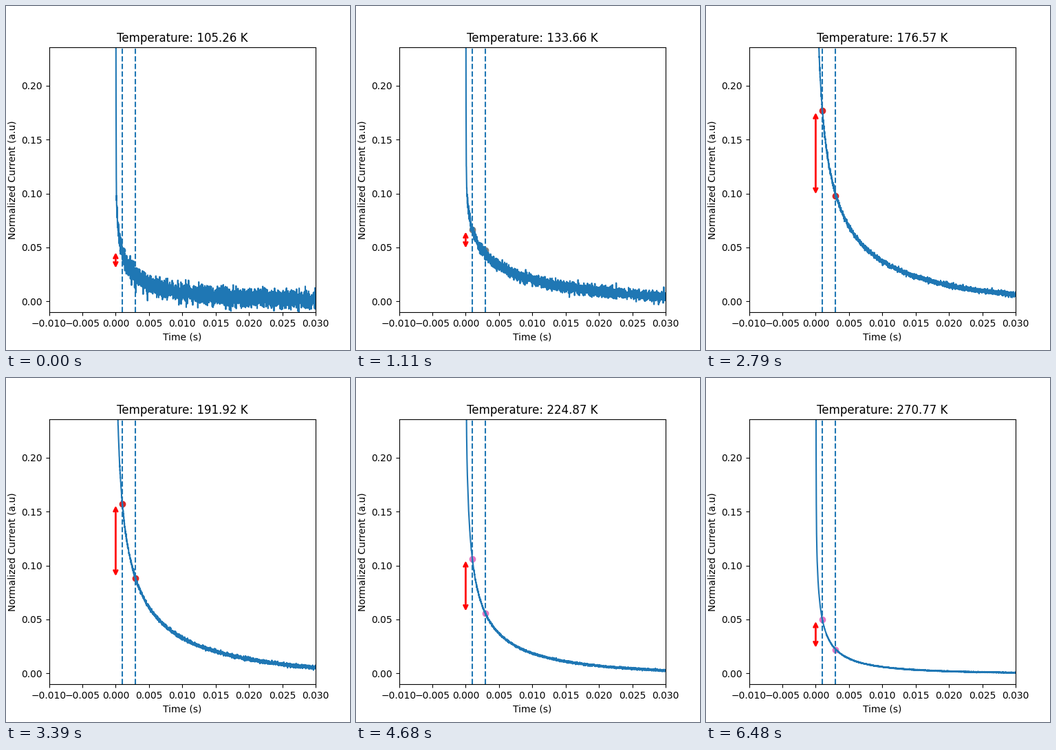
A matplotlib script for the animation above (6510 ms loop, 500 px wide and 500 px high).

```python
import numpy as np
import matplotlib.pyplot as plt
from matplotlib.animation import FuncAnimation

FRAMES, INTERVAL = 217, 30
DT = 0.01  # sampling step in ms
GATES = np.array([1, 3])  # ms
BASELINE = 44  # ms, where the decay is taken as zero
STRETCH = 0.3

# Key points of the sweep: step, temperature, amplitude, decay rate
STEP, TEMP, AMP, RATE = np.transpose([
    (0, 105.26, 0.215, 1.52),
    (37, 133.66, 0.193, 0.90),
    (67, 156.65, 0.647, 1.28),
    (93, 176.57, 0.746, 1.38),
    (134, 208.03, 0.585, 1.40),
    (178, 241.71, 0.505, 1.80),
    (216, 270.77, 0.387, 2.03),
])

t = np.arange(0, 31, DT)
gate_idx = np.rint(GATES / DT).astype(int)


def transient(i):
    """Stretched exponential with a short spike and fading noise."""
    amp, rate = np.interp(i, STEP, AMP), np.interp(i, STEP, RATE)

    def decay(x):
        return amp * np.exp(-rate * x ** STRETCH)

    spike = 0.5 * np.exp(-t / 0.03)
    sigma = 0.0042 * np.exp(-i / 70)
    noise = np.random.default_rng(i).normal(0, sigma, t.size)
    return decay(t) - decay(BASELINE) + spike + noise


fig, ax = plt.subplots(figsize=(5, 5), dpi=100)
ax.set_xlim(-0.01, 0.03)
ax.set_ylim(-0.01, 0.23564)
ax.set_xlabel("Time (s)")
ax.set_ylabel("Normalized Current (a.u)")
title = ax.set_title("")

curve, = ax.plot([], [], color="C0")
for g in GATES / 1000:
    ax.axvline(g, color="C0", linestyle="--")
dots = ax.scatter(GATES / 1000, (0, 0))
arrow = ax.annotate("", xy=(0, 0), xytext=(0, 0.1),
                    arrowprops=dict(arrowstyle="<->", color="red", lw=2))


def update(i):
    y = transient(i)
    hi, lo = y[gate_idx]
    curve.set_data(t / 1000, y)
    dots.set_offsets(np.column_stack([GATES / 1000, (hi, lo)]))
    dots.set_color(f"C{i % 10}")
    arrow.xy = (0, lo)
    arrow.set_position((0, hi))
    title.set_text(f"Temperature: {np.interp(i, STEP, TEMP):.2f} K")
    return curve, dots, arrow, title


anim = FuncAnimation(fig, update, frames=FRAMES, interval=INTERVAL,
                     init_func=lambda: update(0), repeat=True, repeat_delay=0)
plt.show()
```
